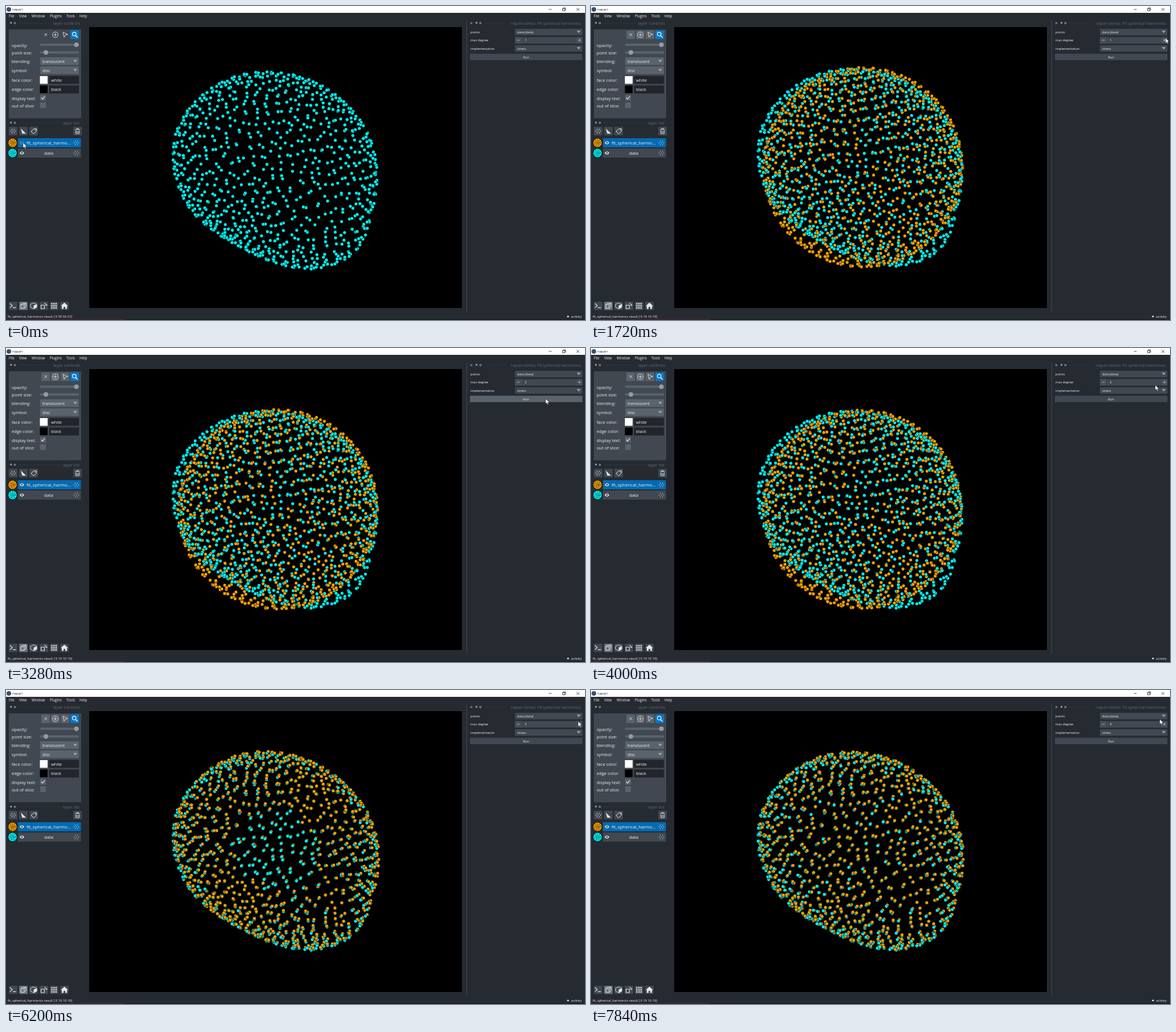
Animation, 1016 px wide and 551 px high, one loop 8000 ms. Source, as an HTML page with a canvas:

```html
<!DOCTYPE html>
<html lang="en">
<head>
<meta charset="utf-8">
<title>Spherical harmonics fit</title>
<style>
html, body { margin: 0; width: 100%; height: 100%; overflow: hidden; background: #262b32; }
canvas, svg { position: absolute; left: 0; top: 0; }
text { font-family: "Open Sans", "Noto Sans", sans-serif; white-space: pre; }
</style>
</head>
<body>
<canvas id="cloud" width="1016" height="551"></canvas>
<svg id="ui" width="1016" height="551" viewBox="0 0 1016 551"></svg>
<script>
const LOOP = 8000, TAU = Math.PI * 2;
const PANEL = '#414851', FIELD = '#5a626c', TEXT = '#f0f1f2', DIM = '#626973', BLUE = '#007acc';
const ORANGE = '#ffa500', CYAN = '#00ffff';

// ---------- Interface ----------
const rect = (x, y, w, h, fill, more = '') =>
  `<rect x="${x}" y="${y}" width="${w}" height="${h}" fill="${fill}" ${more}/>`;
const text = (x, y, size, str, fill = TEXT, anchor = 'start', more = '') =>
  `<text x="${x}" y="${y}" font-size="${size}" fill="${fill}" text-anchor="${anchor}" ${more}>${str}</text>`;
const line = (d, color = '#d4d8dc', width = 1, more = '') =>
  `<path d="${d}" fill="none" stroke="${color}" stroke-width="${width}" ${more}/>`;
const shape = (d, fill, more = '') => `<path d="${d}" fill="${fill}" ${more}/>`;
const dot = (x, y, r, fill) => `<circle cx="${x}" cy="${y}" r="${r}" fill="${fill}"/>`;
const ring = (x, y, r, color = '#d4d8dc', width = 1, more = '') =>
  `<circle cx="${x}" cy="${y}" r="${r}" fill="none" stroke="${color}" stroke-width="${width}" ${more}/>`;
const down = (x, y, fill) => shape(`M${x - 3.5} ${y - 2}h7l-3.5 4.5z`, fill);
const scatter = (x, y, color) => [[0, 0], [-4, 0], [4, 0], [-2, -3], [2, -3], [-2, 3], [2, 3]]
  .map(([a, b]) => dot(x + a, y + b, .85, color)).join('');
const eye = (x, y) => shape(`M${x - 4} ${y}q4 -5.5 8 0q-4 5.5 -8 0z`, '#e8eaec') + dot(x, y, 1.4, '#2b3036');
const thumb = (y, color) => dot(11.5, y, 8, '#000') + dot(11.5, y, 7.4, color) +
  [1.5, 3.5, 5.5].map(r => ring(11.5, y, r, '#000', 1.1, `stroke-dasharray="1.3 ${.8 + r / 4}"`)).join('');
const dock = (x, y) => line(`M${x} ${y + 1.2}l2.5 -2.5m-2.5 0h2.5v2.5`, '#c8ccd0', .9) +
  ring(x + 8.5, y, 1.4, '#c8ccd0', .8);

function leftPanel() {
  const labels = [['opacity:', 71.5], ['point size:', 84.5], ['blending:', 99.5], ['symbol:', 115.5],
    ['face color:', 132.5], ['edge color:', 149], ['display text:', 164.5], ['out of slice:', 178]];
  return dock(7, 30) + line('M23 30H78', '#444a53', 1, 'stroke-dasharray="1 2"') +
    text(130, 33.4, 7.5, 'layer controls', DIM, 'end') +
    rect(5, 41, 127, 156, PANEL, 'rx="1.5"') +
    '<g id="tools">' + [62, 79, 96].map(x => rect(x, 43, 15, 15, FIELD, 'rx="1"')).join('') + '</g>' +
    rect(113, 43, 15, 15, BLUE, 'rx="1"') +
    line('M67.5 48l4.5 4.5m0 -4.5l-4.5 4.5') + ring(86.5, 50.5, 5) + line('M83.5 50.5h6m-3 -3v6') +
    line('M100 46l2 9 2.3 -4 4.2 -1z') + ring(119.7, 49.3, 3.2, '#fff', 1.2) + line('M122 51.7l3.5 3.5', '#fff', 1.4) +
    labels.map(([s, y]) => text(10, y, 7.6, s)).join('') +
    rect(60, 66, 68, 4, FIELD, 'rx="1"') + dot(123.5, 68, 4, '#929ba6') +
    rect(60, 79.5, 68, 4, FIELD, 'rx="1"') + dot(70, 81.5, 4, '#929ba6') +
    rect(60, 90, 68, 13.5, FIELD, 'rx="1"') + text(64, 99.5, 7.4, 'translucent') + down(121.5, 96.5, '#9aa5b4') +
    rect(60, 106, 68, 13.5, FIELD, 'rx="1"') + text(64, 115.5, 7.4, 'disc') + down(121.5, 112.5, '#9aa5b4') +
    rect(59.5, 123, 13.5, 13.5, '#fff') + rect(75.5, 122.5, 52.5, 14, '#22252b') + text(79, 132.5, 7.4, 'white') +
    rect(59.5, 139.5, 13.5, 13.5, '#000') + rect(75.5, 139.5, 52.5, 14, '#22252b') + text(79, 149, 7.4, 'black') +
    rect(60, 156, 10, 10, FIELD) + line('M62 161l2.2 2.3 4 -4.8', TEXT, 1.1) + rect(60, 169, 10, 10, FIELD);
}

function layerList() {
  return dock(7, 205) + line('M23 205H96', '#444a53', 1, 'stroke-dasharray="1 2"') +
    text(129, 208, 7.5, 'layer list', DIM, 'end') +
    [5, 23, 41, 118].map(x => rect(x, 212, 15, 15, PANEL, 'rx="1"')).join('') +
    scatter(12.5, 219.5, '#e4e6e8') + shape('M26 215l9 9h-6.5z', '#e4e6e8') +
    line('M44 220l5 -4.5h4.5v4l-5 5z', '#e4e6e8') + dot(51.5, 217.6, .8, '#e4e6e8') +
    line('M121.5 216.5h8m-5.5 0v-1.5h3v1.5m-4.5 1.5v6h6v-6m-4 1.5v3m2 -3v3', '#e4e6e8', .9) +
    thumb(240, ORANGE) + rect(21, 232, 110.5, 16, '#046bb2', 'rx="1"') +
    `<g id="eye">${eye(28, 240)}</g>` + text(36, 243, 7.8, 'fit_spherical_harmo...') + scatter(123.5, 240, '#b9d2e4') +
    thumb(258, CYAN) + rect(21, 250, 110.5, 16, PANEL, 'rx="1"') +
    eye(28, 258) + text(75, 261, 7.8, 'data', TEXT, 'middle') + scatter(123.5, 258, '#b4bac0');
}

function viewButtons() {
  const grid = [0, 1, 2].map(i => [0, 1, 2].map(j => rect(79.3 + i * 3.7, 521.3 + j * 3.7, 2.4, 2.4, '#e4e6e8')).join('')).join('');
  return [5, 23, 41, 59, 77, 95].map((x, i) => rect(x, 519, 15, 14.5, i == 1 ? '#69727d' : PANEL, 'rx="1"')).join('') +
    line('M7 522l4 3.7 -4 3.7m5 0h5.5', '#e4e6e8', 1.2) +
    line('M26 524l3 -2.5h6v6l-3 3h-6zh6v6.5m0 -6.5l3 -2.5', '#e4e6e8') +
    line('M43 523.5l5 -2.5 6 2.5v5l-5 3 -6 -3z') + shape('M48.5 525.5l5.5 -2v5l-5.5 3z', '#e4e6e8') +
    line('M61.5 525h6v6h-6z', '#e4e6e8', 1.1) + line('M67 521.5q4 0 4 4m-2 -1.5l2 2 1.5 -2', '#e4e6e8') +
    grid + shape('M102.5 520.5l6.5 6h-2v5h-3v-3.5h-3v3.5h-3v-5h-2z', '#e4e6e8');
}

function rightPanel() {
  const row = (y, label) => text(815, y + 2.2, 5.7, label) + rect(893, y - 5.5, 118.5, 11.5, PANEL, 'rx="1"');
  return line('M808.5 25V536', PANEL) +
    line('M815 28.5l3 3m0 -3l-3 3', '#c8ccd0', .9) + dock(824, 30) +
    line('M841 30H875', '#444a53', 1, 'stroke-dasharray="1 2"') +
    text(1009, 33.2, 7.1, 'napari-stress: Fit spherical harmonics', DIM, 'end') +
    row(45.5, 'points') + text(897, 47.8, 5.7, 'data (data)') + down(1005, 45.3, '#8f9fc0') +
    row(60, 'max degree') + rect(893, 54.5, 11, 11.5, '#484f59') + rect(1001, 54.5, 10.5, 11.5, '#484f59') +
    line('M896.5 60h5', '#b4bac4', .9) + line('M1003.8 60h5m-2.5 -2.5v5', '#b4bac4', .9) +
    rect(909.7, 56, 4.6, 8, '#a4aab2', 'id="mark"') + text(912, 62.2, 5.8, '1', TEXT, 'middle', 'id="degree"') +
    row(74.3, 'implementation') + text(897, 76.5, 5.7, 'stress') + down(1005, 74, '#8f9fc0') +
    rect(814, 83.7, 197.5, 11.3, PANEL, 'id="run" rx="1"') + text(912.5, 91.6, 5.8, 'Run', TEXT, 'middle');
}

const menu = [['File', 5], ['View', 23], ['Window', 45], ['Plugins', 77], ['Tools', 106], ['Help', 129]];
const $ = id => document.getElementById(id);
$('ui').innerHTML = rect(0, 0, 1016, 12, '#fff') + dot(5, 6, 4, '#3c5068') +
  text(11, 8.2, 6, 'napari', '#222') +
  line('M952.5 6h5', '#222', .8) + line('M976.5 4.5h4v4h-4zm1.5 0v-1.3h4v4h-1.3', '#222', .8) +
  line('M1001 3.5l5 5m0 -5l-5 5', '#222', .8) +
  menu.map(([s, x]) => text(x, 20.4, 6.2, s)).join('') +
  leftPanel() + layerList() + viewButtons() + rightPanel() +
  text(3, 547, 5.7, '', TEXT, 'start', 'id="status"') +
  shape('M984 546l2.2 -3.3 2.2 3.3z', TEXT) + text(1010, 547, 5.7, 'activity', TEXT, 'end') +
  rect(0, 550, 1016, 1, '#15161b') + rect(0, 550, 208, 1, '#4a2434') +
  shape('M0 0v9.2l2.2 -2 1.5 3.4 1.5 -.7 -1.5 -3.3h2.9z', '#fff', 'id="cursor" stroke="#111" stroke-width=".5"');

// ---------- Point cloud ----------
let seed = 11;
const rand = () => (seed = seed * 16807 % 2147483647) / 2147483647;
const spread = size => (rand() - .5) * size;

// Silhouette radii, clockwise from the right, every 22.5 degrees.
const radii = [180, 186, 201, 187, 162, 148, 151, 164, 176, 185, 183, 178, 172, 170, 171, 176];
function radius(angle) {
  const u = (angle / TAU * 16 + 16) % 16, i = Math.floor(u), f = u - i;
  const [a, b, c, d] = [15, 16, 17, 18].map(k => radii[(i + k) % 16]);
  return b + f / 2 * (c - a + f * (2 * a - 5 * b + 4 * c - d + f * (3 * (b - c) + d - a)));
}

const turn = (a, b, angle) =>
  [a * Math.cos(angle) - b * Math.sin(angle), a * Math.sin(angle) + b * Math.cos(angle)];

// Roughly even directions on a tilted sphere; mix varies which layer lies in front.
const COUNT = 920;
const dirs = Array.from({ length: COUNT }, (_, i) => {
  const h = 1 - (2 * i + 1) / COUNT, s = Math.sqrt(1 - h * h), a = i * 2.399963;
  let x = s * Math.cos(a) + spread(.06), y = h + spread(.06), z = s * Math.sin(a) + spread(.06);
  [y, z] = turn(y, z, .5);
  [x, y] = turn(x, y, .35);
  const n = Math.hypot(x, y, z);
  return { x: x / n, y: y / n, z: z / n, mix: spread(2) };
});

const CX = 471, CY = 283;
function dataPoint({ x, y, z }, dy = 0) {
  const r = radius(Math.atan2(y, x));
  return { x: CX + x * r, y: CY + dy + y * r, z: z * 175, color: CYAN };
}

function fitPoint(dir, degree) {
  let { x, y, z, mix } = dir;
  if (degree < 3) {
    const lift = 90 * x * y;
    [x, y] = turn(x, y, degree == 1 ? .035 : .025);
    [x, z] = turn(x, z, .04);
    const r = degree == 1 ? 175 : 174;
    return { x: 478 - degree + x * r, y: 283 + y * r, z: z * r + lift, color: ORANGE };
  }
  const a = Math.atan2(y, x), rho = Math.hypot(x, y), p = dataPoint(dir);
  const corner = Math.max(0, x + y - .5);
  const lift = degree == 3
    ? Math.min(rho - .42, .3) - corner * .35 + mix * rho ** 3 * .6
    : .4 - corner * .4 - rho ** 4 * .25 + mix * .5;
  const k = 1 + (degree == 3 ? .012 : .006) * Math.sin(3 * a + 1);
  const slide = mix * rho * 3;
  return {
    x: CX + (p.x - CX) * k + 1 - slide * y,
    y: CY + (p.y - CY) * k - 1.2 + slide * x,
    z: p.z + lift * 30, color: ORANGE
  };
}

const ctx = $('cloud').getContext('2d');
function drawCloud(degree) {
  ctx.fillStyle = '#000';
  ctx.fillRect(146, 37, 654, 493);
  const points = degree
    ? dirs.flatMap(d => [dataPoint(d), fitPoint(d, degree)])
    : dirs.map(d => dataPoint(d, 5));
  points.sort((a, b) => a.z - b.z);
  ctx.strokeStyle = '#000';
  ctx.lineWidth = .6;
  for (const p of points) {
    ctx.beginPath();
    ctx.arc(p.x, p.y, 2.9, 0, TAU);
    ctx.fillStyle = p.color;
    ctx.fill();
    ctx.stroke();
  }
}

// ---------- Timeline ----------
const SHOW = 240, CLICKS = [2100, 4360, 6400], RUNS = [3560, 5400, 7360];
const path = [
  [0, 30, 240], [760, 30, 240], [840, 45, 233], [1000, 250, 195], [1200, 530, 140], [1360, 760, 95],
  [1560, 960, 62], [1720, 1008, 56], [2480, 1007, 56], [2800, 955, 87], [3000, 947, 89],
  [3780, 947, 89], [4000, 990, 65], [4160, 1005, 56], [4680, 1005, 56], [4880, 960, 83], [5080, 945, 89],
  [5780, 945, 89], [6080, 1004, 55], [6680, 1004, 55], [7040, 946, 89], [7560, 946, 89], [7840, 998, 51], [8000, 1003, 54]
];
const passed = (times, t) => times.filter(s => t >= s).length;

function cursorAt(t) {
  const i = path.findIndex(p => p[0] > t), [t0, x0, y0] = path[i - 1], [t1, x1, y1] = path[i];
  const f = (t - t0) / (t1 - t0);
  return [x0 + (x1 - x0) * f, y0 + (y1 - y0) * f];
}

let shown;
function frame(now) {
  const t = now % LOOP, visible = t >= SHOW;
  const fit = visible ? 1 + passed(RUNS, t) : 0;
  if (fit !== shown) drawCloud(shown = fit);

  const [x, y] = cursorAt(t);
  $('cursor').setAttribute('transform', `translate(${x.toFixed(1)} ${y.toFixed(1)})`);
  $('run').setAttribute('fill', x > 814 && y > 82 && y < 95 ? FIELD : PANEL);
  $('tools').style.opacity = visible ? 1 : 0;
  $('eye').style.opacity = visible ? 1 : .35;

  const marked = CLICKS.some((c, i) => t >= c && t < [2700, 5400, 7100][i]);
  $('degree').textContent = 1 + passed(CLICKS, t);
  $('degree').setAttribute('fill', marked ? '#e4e6e8' : TEXT);
  $('mark').style.opacity = marked ? 1 : 0;
  $('status').textContent = `fit_spherical_harmonics result [ 0 ${t < 1000 ? '39 56 37' : '19 10 19'}]`;
  requestAnimationFrame(frame);
}
requestAnimationFrame(frame);
</script>
</body>
</html>
```
